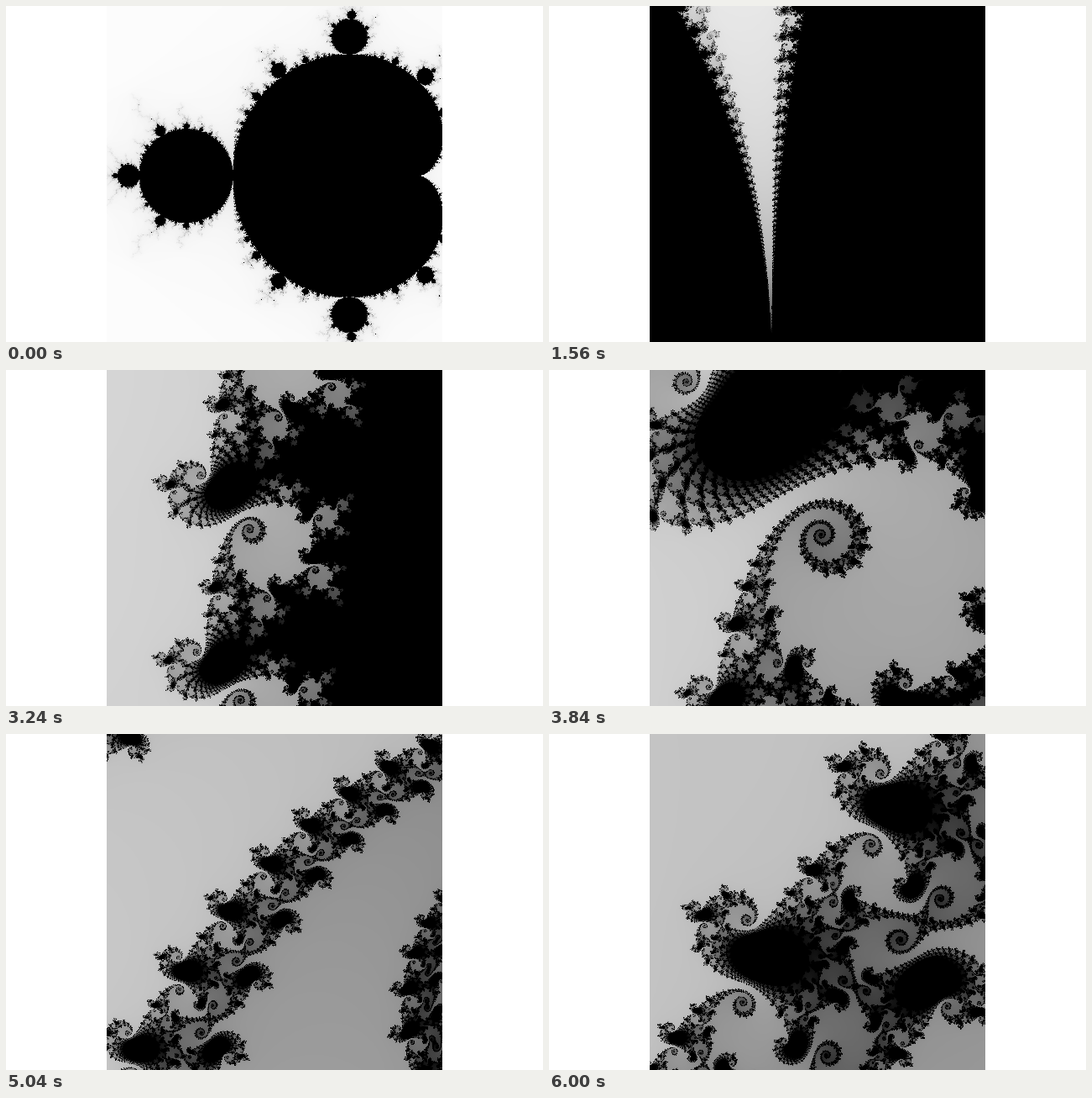
An HTML page with a canvas that plays this animation: 640x400 px, repeating every 6060 ms.

```html
<!DOCTYPE html>
<html lang="en">
<head>
<meta charset="utf-8">
<title>Mandelbrot zoom</title>
<style>
html, body { margin: 0; width: 100%; height: 100%; overflow: hidden; background: #fff; }
canvas { position: absolute; left: 120px; top: 0; }
</style>
</head>
<body>
<canvas width="400" height="400"></canvas>
<script>
const SIZE = 400, FRAMES = 101, FRAME_MS = 60, MAX_ITER = 255;
const START_WIDTH = 2, SHRINK = 0.9;
const ctx = document.querySelector('canvas').getContext('2d');

// Newton search for a point whose orbit lands on the 2-cycle after n steps.
function landingPoint([x, y], n) {
  for (let pass = 0; pass < 20; pass++) {
    let zx = 0, zy = 0, dx = 0, dy = 0;
    for (let i = 0; i < n; i++) {
      [dx, dy] = [2 * (zx * dx - zy * dy) + 1, 2 * (zx * dy + zy * dx)];
      [zx, zy] = [zx * zx - zy * zy + x, 2 * zx * zy + y];
    }
    const gx = zx * zx - zy * zy + zx + x + 1, gy = 2 * zx * zy + zy + y;
    const sx = (2 * zx + 1) * dx - 2 * zy * dy + 1, sy = (2 * zx + 1) * dy + 2 * zy * dx;
    const norm = sx * sx + sy * sy;
    x -= (gx * sx + gy * sy) / norm;
    y -= (gy * sx - gx * sy) / norm;
  }
  return [x, y];
}

// Centre of the largest spiral within a radius of the guess.
function spiralCentre(guess, radius) {
  for (let n = 30; n < 250; n++) {
    const point = landingPoint(guess, n);
    if (Math.hypot(point[0] - guess[0], point[1] - guess[1]) < radius) return point;
  }
  return guess;
}

const shift = ([x, y], right, down, step) => [x + right * step, y - down * step];

// The zoom ends on an arm of the big spiral, between two small spirals
// that lie 152 px across and 189 px up from each other in the last picture.
const bigSpiral = spiralCentre([-0.74807, 0.0718], 5e-4);
const armPoint = shift(bigSpiral, -147.7, -27.4, 1.975e-6);
const lower = spiralCentre(shift(armPoint, -39.3, 133.4, 2.49e-7), 1.2e-5);
const upper = spiralCentre(shift(lower, 152, -189, 2.49e-7), 6e-6);
const lastStep = Math.hypot(upper[0] - lower[0], upper[1] - lower[1]) / Math.hypot(152, 189);
const middle = [(lower[0] + upper[0]) / 2, (lower[1] + upper[1]) / 2];
const [focusX, focusY] = shift(middle, -36.7, -38.9, lastStep);

const lastShrink = SHRINK ** FRAMES;
const END_WIDTH = (lastStep * SIZE - START_WIDTH * lastShrink) / (1 - lastShrink);

function inMainBodies(x, y) {
  const q = (x - 0.25) ** 2 + y * y;
  return q * (q + x - 0.25) <= y * y / 4 || (x + 1) ** 2 + y * y <= 1 / 16;
}

function escapeTime(x, y) {
  if (inMainBodies(x, y)) return MAX_ITER;
  let zx = 0, zy = 0, xx = 0, yy = 0, n = 0;
  while (n < MAX_ITER && xx + yy <= 4) {
    zy = 2 * zx * zy + y;
    zx = xx - yy + x;
    xx = zx * zx;
    yy = zy * zy;
    n++;
  }
  return n;
}

// The window shrinks from [-1.5, 0.5] x [-1, 1] towards the focus.
function render(frame) {
  const width = END_WIDTH + (START_WIDTH - END_WIDTH) * SHRINK ** (frame + 1);
  const left = focusX - width * (focusX + 1.5) / 2;
  const top = focusY + width * (1 - focusY) / 2;
  const step = width / SIZE;
  const image = ctx.createImageData(SIZE, SIZE);
  const pixels = new Uint32Array(image.data.buffer);
  for (let row = 0, p = 0; row < SIZE; row++) {
    for (let col = 0; col < SIZE; col++) {
      const grey = 255 - escapeTime(left + col * step, top - row * step);
      pixels[p++] = 0xff000000 | grey * 0x010101;
    }
  }
  return image;
}

const cache = [];
let shown = -1;
function draw() {
  const frame = Math.floor(performance.now() / FRAME_MS) % FRAMES;
  if (frame !== shown) {
    cache[frame] ??= render(frame);
    ctx.putImageData(cache[frame], 0, 0);
    shown = frame;
  }
  requestAnimationFrame(draw);
}
draw();
</script>
</body>
</html>
```
